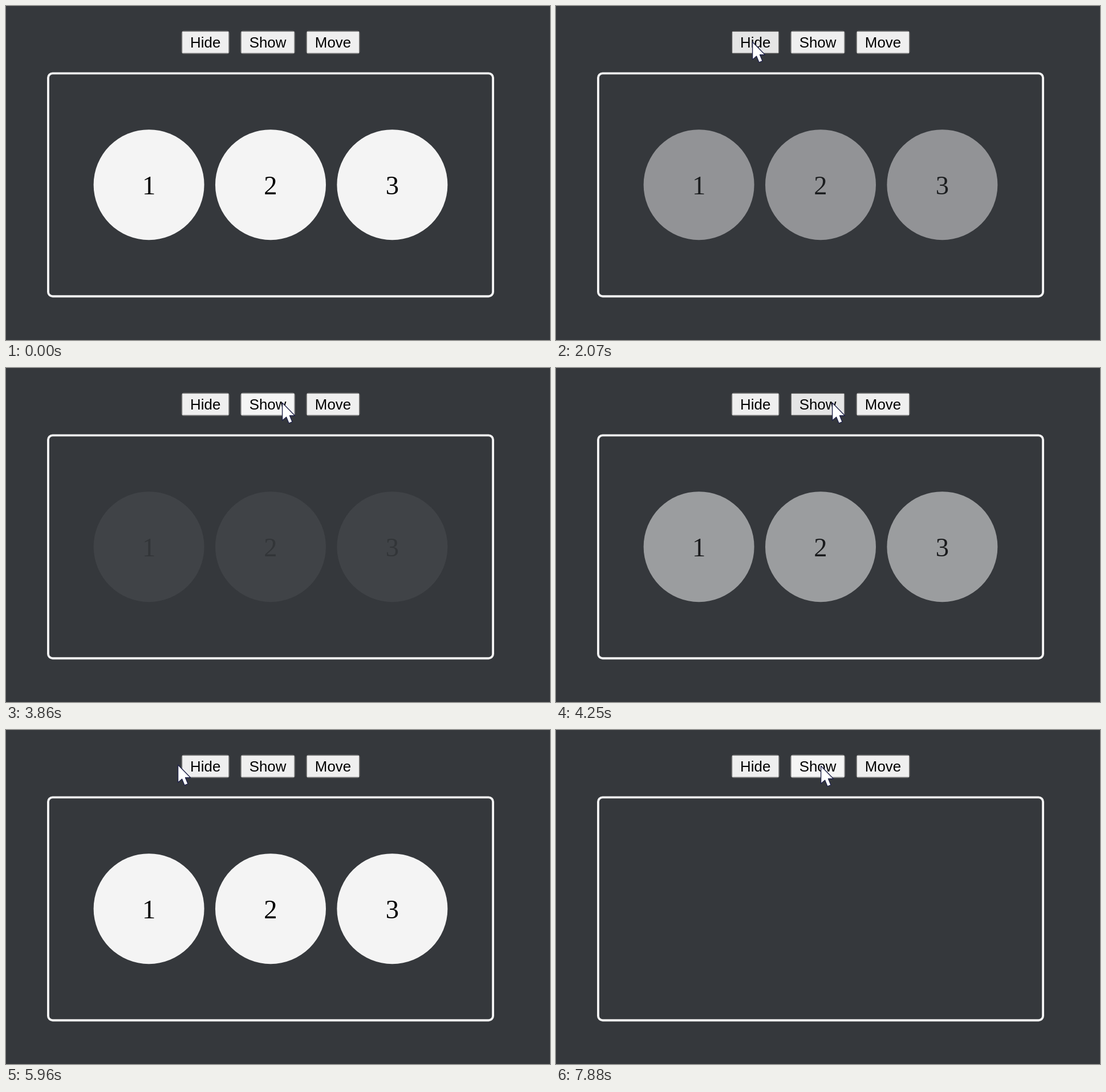
An HTML page with a canvas for the animation above (8000 ms loop, 954 px wide and 587 px high).

```html
<!DOCTYPE html>
<html lang="en">
<head>
<meta charset="utf-8">
<title>Hide, show, move</title>
<style>
  html, body { margin: 0; width: 100%; height: 100%; overflow: hidden; background: #35383c; }
  canvas { display: block; }
</style>
</head>
<body>
<canvas id="stage" width="954" height="587"></canvas>
<script>
const ctx = document.getElementById('stage').getContext('2d');
const LOOP = 8000;
const STEP = 80;
const ZOOM = 1.94;
const BACK = [53, 56, 60];
const LIGHT = [244, 244, 244];
const BLACK = [0, 0, 0];
const SANS = `${13.333 * ZOOM}px "Liberation Sans", Arial, sans-serif`;
const SERIF = `${24 * ZOOM}px "Liberation Serif", "Times New Roman", serif`;

const looks = {
  normal: ['#efefef', '#767676'],
  hover: ['#e5e5e5', '#4f4f4f'],
  active: ['#f5f5f5', '#8d8d8d']
};

// Pointer legs; each one begins where the previous ended.
const entry = { x: 48, y: 240 };
const legs = [
  { start: 500, end: 650, x: 63, y: 141 },
  { start: 730, end: 800, x: 76, y: 161 },
  { start: 1040, end: 1660, x: 344, y: 63 },
  { start: 3210, end: 3440, x: 484, y: 61 },
  { start: 5960, end: 5960, x: 301, y: 61 },
  { start: 6280, end: 6370, x: 327, y: 60 },
  { start: 7150, end: 7390, x: 431, y: 64 },
  { start: 7470, end: 7630, x: 464, y: 63 }
];

// The first fade stops just short of invisible.
const clicks = [
  { down: 1750, up: 1820, fade: 1760, until: 2460, show: false },
  { down: 3860, up: 4010, fade: 3938, until: LOOP, show: true },
  { down: 6450, up: 6590, fade: 6490, until: LOOP, show: false },
  { down: 7880, up: LOOP }
];

const smooth = k => k * k * (3 - 2 * k);
const mix = (a, b, k) => a + (b - a) * k;
const stepped = time => Math.floor(time / STEP) * STEP;
const blend = (color, alpha) =>
  `rgb(${color.map((c, i) => Math.round(mix(BACK[i], c, alpha))).join(',')})`;

// The CSS "ease" curve, solved by bisection.
function ease(p) {
  if (p >= 1) return 1;
  const bezier = (t, a, b) => 3 * (1 - t) * (1 - t) * t * a + 3 * (1 - t) * t * t * b + t * t * t;
  let low = 0, high = 1;
  for (let i = 0; i < 24; i++) {
    const mid = (low + high) / 2;
    if (bezier(mid, 0.25, 0.25) < p) low = mid; else high = mid;
  }
  return bezier(low, 0.1, 1);
}

function pointerAt(time) {
  const index = legs.findLastIndex(leg => leg.start <= time);
  if (index < 0) return null;
  const leg = legs[index];
  const from = legs[index - 1] || entry;
  const travelled = stepped(time - leg.start) + STEP;
  const k = smooth(Math.min(1, travelled / (leg.end - leg.start + STEP)));
  return { x: mix(from.x, leg.x, k), y: mix(from.y, leg.y, k) };
}

function opacityAt(time) {
  const click = clicks.findLast(c => c.up <= time);
  if (!click) return 1;
  const now = click.up + stepped(Math.min(time, click.until) - click.up);
  const progress = ease((now - click.fade) / 1000);
  return click.show ? progress : 1 - progress;
}

function strokeBox(x, y, w, h, radius, line) {
  ctx.beginPath();
  ctx.roundRect(x + line / 2, y + line / 2, w - line, h - line, radius - line / 2);
  ctx.lineWidth = line;
  ctx.stroke();
}

function drawButtons(pointer, pressed) {
  const y = 43.5, h = 21 * ZOOM, padding = 8 * ZOOM;
  let x = 307.6;
  ctx.font = SANS;
  for (const label of ['Hide', 'Show', 'Move']) {
    const w = ctx.measureText(label).width + 2 * padding;
    const hovered = pointer && pointer.x >= x && pointer.x <= x + w
      && pointer.y >= y && pointer.y <= y + h;
    const [fill, border] = looks[!hovered ? 'normal' : pressed ? 'active' : 'hover'];
    ctx.fillStyle = fill;
    ctx.strokeStyle = border;
    strokeBox(x, y, w, h, 4.3, 1.8);
    ctx.fillRect(x + 1.6, y + 1.6, w - 3.2, h - 3.2);
    ctx.fillStyle = '#000';
    ctx.fillText(label, x + w / 2, 72.7);
    x += w + 10 * ZOOM;
  }
}

function drawCircle(number, alpha) {
  const x = 464 + (number - 2) * 110 * ZOOM;
  ctx.beginPath();
  ctx.arc(x, 314.2, 50 * ZOOM, 0, Math.PI * 2);
  ctx.fillStyle = blend(LIGHT, alpha);
  ctx.fill();
  ctx.fillStyle = blend(BLACK, alpha);
  ctx.font = SERIF;
  ctx.fillText(number, x, 331);
}

function drawPointer({ x, y }) {
  ctx.save();
  ctx.translate(x + 0.6, y + 0.2);
  const arrow = new Path2D('M0 0V31L7 25L11.5 36L17.5 33.5L13 22.5H22Z');
  ctx.fillStyle = '#fff';
  ctx.fill(arrow);
  ctx.strokeStyle = '#20234a';
  ctx.lineWidth = 1.4;
  ctx.lineJoin = 'round';
  ctx.stroke(arrow);
  ctx.restore();
}

function draw(time) {
  const pointer = pointerAt(time);
  const pressed = clicks.some(c => time >= c.down && time < c.up);
  const alpha = opacityAt(time);

  ctx.fillStyle = blend(BACK, 1);
  ctx.fillRect(0, 0, 954, 587);
  ctx.textAlign = 'center';
  drawButtons(pointer, pressed);

  ctx.strokeStyle = blend(LIGHT, 1);
  strokeBox(72, 116.4, 784, 395.8, 9.7, 2 * ZOOM);

  if (alpha > 0) [1, 2, 3].forEach(number => drawCircle(number, alpha));
  if (pointer) drawPointer(pointer);
}

const begin = performance.now();
function tick() {
  draw((performance.now() - begin) % LOOP);
  requestAnimationFrame(tick);
}
tick();
</script>
</body>
</html>
```
